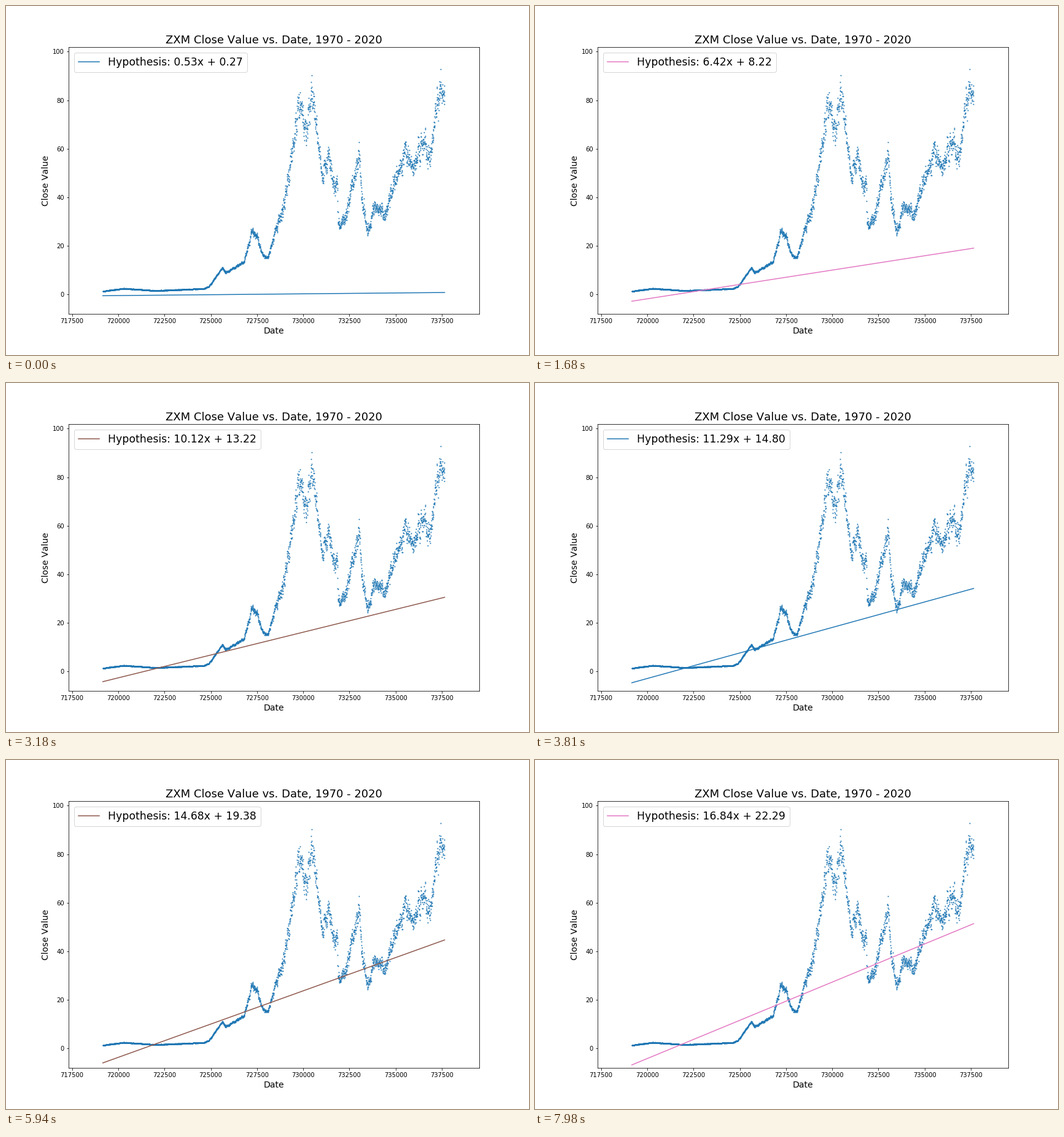
Animation, 852 px wide and 569 px high, one loop 8000 ms. Source, as a matplotlib script:

```python
import numpy as np
import matplotlib.pyplot as plt
from matplotlib.animation import FuncAnimation

W, H, DPI = 852, 569, 72
LOOP, TICK = 8000, 20
FIRST, LAST = 719164, 737650

# Gradient descent on standardised dates: (slope, intercept)
START = np.array([0.533, 0.272])
GOAL = np.array([21.857, 29.069])
RATE = 0.007

# Main turns of the price: (thousands of days, value)
TURNS = [
    (719.2, 1.3), (720.3, 2.4), (722, 1.5), (724.6, 2.3), (724.9, 3.2),
    (725.63, 11), (725.8, 8.8), (726.8, 13.5), (727.22, 26), (727.45, 25),
    (727.8, 16), (728.1, 15), (728.7, 32), (728.9, 34), (729.8, 78),
    (730.17, 66), (730.45, 87), (730.8, 63), (731.07, 49), (731.37, 58),
    (731.6, 46), (731.85, 45), (731.88, 29), (732.25, 30), (733.01, 58),
    (733.2, 38), (733.5, 25), (733.8, 36), (734.4, 33), (735.5, 59),
    (735.95, 52), (736.5, 64), (736.83, 55), (737.42, 87), (737.64, 79),
]


def smooth_noise(rng, size, span):
    return np.convolve(rng.normal(size=size), np.ones(span) / span**0.5, "same")


def prices():
    rng = np.random.default_rng(7)
    days = np.arange(FIRST, LAST, 7)
    base = np.interp(days / 1000, *zip(*TURNS))
    noise = 0.03 * smooth_noise(rng, days.size, 6) + 0.03 * rng.normal(size=days.size)
    noise *= np.clip(base / 30, 0.5, 1)
    return days, np.minimum(base * (1 + noise), 92.7)


def params(step):
    return GOAL - (GOAL - START) * (1 - RATE) ** step


plt.rcParams["text.kerning_factor"] = 6
fig = plt.figure(figsize=(W / DPI, H / DPI), dpi=DPI, facecolor="white")
ax = fig.add_axes([102 / W, 67 / H, 669 / W, 434.88 / H])
ax.scatter(*prices(), s=1, linewidths=1, color="C0")
line, = ax.plot([FIRST, LAST], [0, 0], label="Hypothesis")
ax.set_xlim(717313, 739524)
ax.set_ylim(-8.09, 101.84)
ax.set_xticks(np.arange(717500, 737501, 2500))
ax.set_yticks(np.arange(0, 101, 20))
ax.ticklabel_format(useOffset=False, style="plain")
ax.set_title("ZXM Close Value vs. Date, 1970 - 2020", fontsize=18)
ax.set_xlabel("Date", fontsize=14)
ax.set_ylabel("Close Value", fontsize=14)
legend = ax.legend(loc="upper left", fontsize="xx-large")
key, label = legend.get_lines()[0], legend.get_texts()[0]


def update(i):
    # Training slows down slightly over the loop
    step = round(205.6 * (i * TICK / 7980) ** 0.966)
    # The line is drawn before the update, the label after it
    slope, offset = params(step - 1)
    line.set_ydata(offset + slope * np.array([-1.732, 1.732]))
    label.set_text("Hypothesis: {:.2f}x + {:.2f}".format(*params(step)))
    for artist in (line, key):
        artist.set_color(f"C{step % 10}")
    return line, key, label


anim = FuncAnimation(fig, update, frames=LOOP // TICK, interval=TICK,
                     repeat=True, repeat_delay=0)
plt.show()
```
